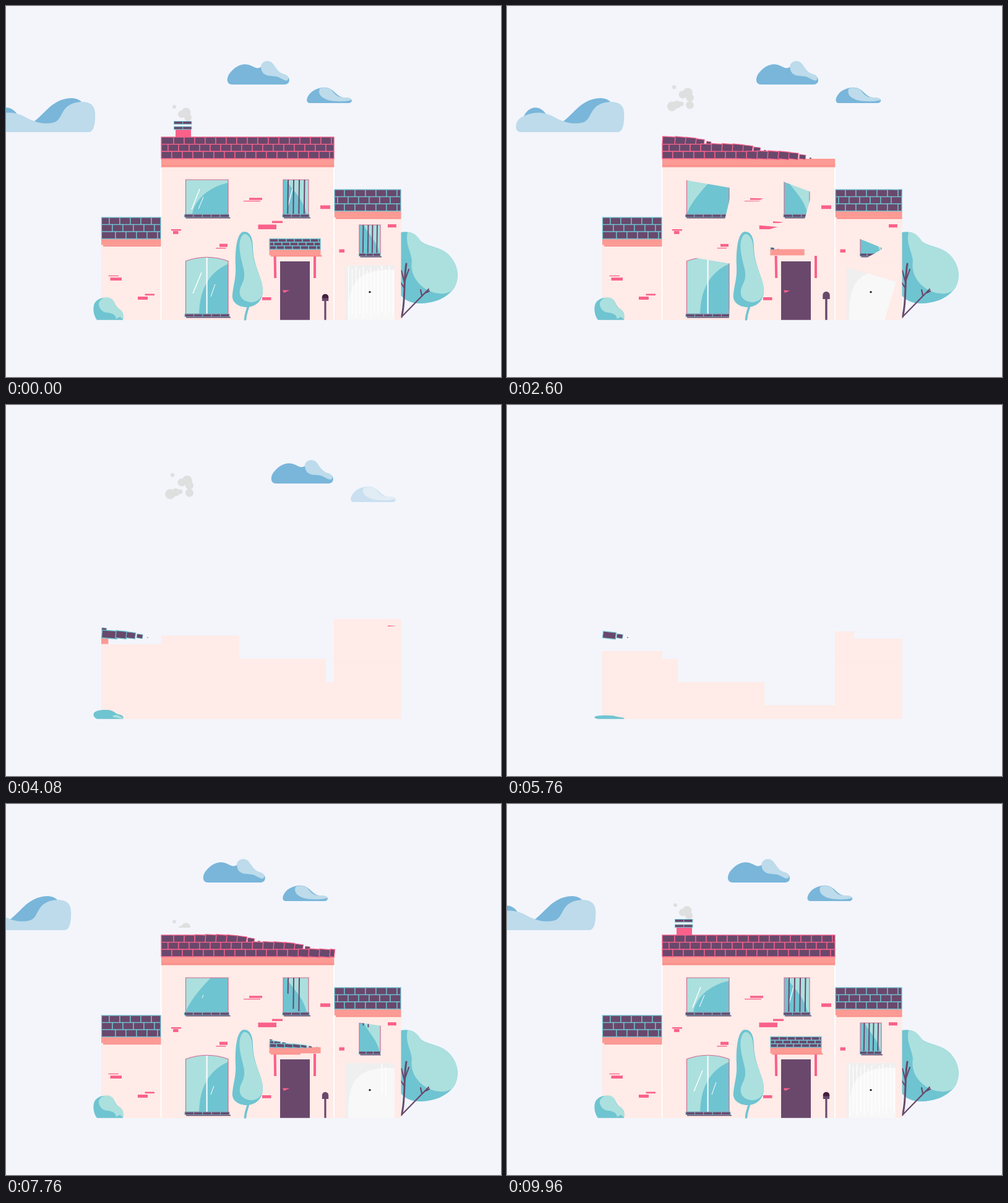
An HTML page for the animation above (10 s loop, 800x600 px).

```html
<!DOCTYPE html>
<html lang="en">
<head>
<meta charset="utf-8">
<title>House</title>
<style>
html,body{margin:0;width:100%;height:100%;overflow:hidden;background:#f3f5fb}
svg{display:block;width:800px;height:600px}
</style>
</head>
<body>
<svg id="stage" viewBox="0 0 800 600" xmlns="http://www.w3.org/2000/svg">
<defs><clipPath id="vent"><rect x="240" y="80" width="90" height="120"/></clipPath></defs>
</svg>
<script>
const NS = 'http://www.w3.org/2000/svg';
const stage = document.getElementById('stage');
const defs = stage.querySelector('defs');
const PURPLE = '#69486c', PINK = '#f9618b', SALMON = '#fc9a94', SALMON2 = '#fb918b',
      TEAL = '#6fc4d1', MINT = '#abe0de', WALL = '#ffebe7', GREY = '#dfdfdf';
const LOOP = 10000;
const parts = [];   // called with the folded time: the build is the teardown run backwards
const drift = [];   // called with the plain loop time

const clamp = v => Math.max(0, Math.min(1, v));
const prog = (t, start, dur) => clamp((t - start) / dur);
const back = (u, s = 1.7) => Math.max(0, 1 - u * u * ((s + 1) * u - s));

function add(tag, attrs, parent = stage) {
  const el = document.createElementNS(NS, tag);
  for (const k in attrs) el.setAttribute(k, attrs[k]);
  parent.appendChild(el);
  return el;
}
const group = (parent = stage) => add('g', {}, parent);
const path = (d, fill, parent) => add('path', {d, fill}, parent);
const rect = (x, y, width, height, fill, parent) => add('rect', {x, y, width, height, fill}, parent);
const line = (d, stroke, w, parent) =>
  add('path', {d, stroke, 'stroke-width': w, fill: 'none', 'stroke-linecap': 'round'}, parent);

// Scale out around a pivot, swelling first.
function shrink(el, x, y, start, dur, rot = 0, s = 1.7) {
  parts.push(t => {
    const u = prog(t, start, dur), k = back(u, s);
    el.setAttribute('transform', `translate(${x} ${y}) rotate(${rot * u}) scale(${k}) translate(${-x} ${-y})`);
    el.style.display = u < 1 ? '' : 'none';
  });
}

// Cut away by an edge that turns while it falls.
let clips = 0;
function wipe(el, x, y, w, h, start, dur) {
  const id = 'cut' + clips++;
  const poly = add('polygon', {}, add('clipPath', {id}, defs));
  el.setAttribute('clip-path', `url(#${id})`);
  parts.push(t => {
    const u = prog(t, start, dur);
    const pad = u ? 0 : 2;
    poly.setAttribute('points', [
      [x - pad, y + h * u ** 2.1 - pad], [x + w + pad, y + h * u ** 0.8 - pad],
      [x + w * (1 - u) + pad, y + h + pad], [x - pad, y + h + pad]].join(' '));
    el.style.display = u < 1 ? '' : 'none';
  });
}

// Bar that pulls back to its left end.
function slab(x, y, w, h, fill, start, dur) {
  const el = rect(x, y, w, h, fill);
  parts.push(t => el.setAttribute('width', w * (1 - prog(t, start, dur))));
}

// Line that pulls back to its first point.
function streak(x0, y0, x1, y1, color, w, start, dur, parent) {
  const el = line('', color, w, parent);
  el.setAttribute('stroke-linecap', 'butt');
  parts.push(t => {
    const k = 1 - prog(t, start, dur);
    el.setAttribute('d', `M${x0} ${y0}L${x0 + (x1 - x0) * k} ${y0 + (y1 - y0) * k}`);
    el.style.display = k ? '' : 'none';
  });
}

// Three rows of tiles; each row is [first joint, start time].
function roof(x0, x1, top, h, pitch, stroke, rows) {
  rows.forEach(([joint, start], r) => {
    const base = top + h * (r + 1);
    for (let a = x0, b = joint; a < x1 - 1; a = b, b += pitch) {
      const end = Math.min(b, x1);
      const el = add('rect', {x: 0, y: -h, width: end - a, height: h, fill: PURPLE, stroke, 'stroke-width': 1.3});
      const begin = start + Math.max(0, (x1 - pitch - a) / pitch * 80);
      const left = a;
      parts.push(t => {
        const u = prog(t, begin, 640);
        el.setAttribute('transform', `translate(${left} ${base}) rotate(${9 * u}) scale(${back(u)})`);
        el.style.display = u < 1 ? '' : 'none';
      });
    }
  });
}

// Clouds
function cloud(dark, light, outAt, outDur, inAt, inDur) {
  const g = group();
  path(dark, '#79b6da', g);
  path(light, '#bddbeb', g);
  drift.push(t => {
    const s = t < 5000 ? t : t - LOOP;
    g.setAttribute('transform', `translate(${s * 0.0174} 0)`);
    g.setAttribute('opacity', t < 5000 ? 1 - prog(t, outAt, outDur) : prog(t, inAt, inDur));
  });
}
cloud('M-19 180C-10 160 8 160 18 175ZM40 190C60 180 72 150 105 149C112 149 118 151 122 155L100 190Z',
  'M-23 204C-34 204 -33 186 -22 180C-6 171 10 170 26 177C44 187 58 192 74 189C95 187 84 157 122 155C141 155 145 165 144 180C144 195 140 204 134 204Z',
  3500, 400, 6600, 400);
cloud('M366 127C354 127 357 113 363 107C371 97 382 92 392 95C400 97 405 104 413 98C424 92 434 112 452 112C460 115 460 127 450 127Z',
  'M412 97C414 88 426 86 432 94C437 101 441 108 449 110C456 112 458 116 455 120C452 122 447 118 440 115C432 111 412 118 412 97Z',
  4250, 350, 6000, 300);
cloud('M490 157C484 156 486 148 490 143C496 135 508 131 517 132C530 133 533 146 545 148C552 148 559 149 559 153C558 157 555 157 552 157Z',
  'M507 134C512 131 523 132 527 137C533 145 537 148 548 148C553 148 559 149 558 152C550 155 530 155 520 152C508 148 504 141 507 134Z',
  3940, 210, 6420, 300);

// Smoke puffs: x, y, radius, late (1 = swells later)
const smoke = add('g', {'clip-path': 'url(#vent)', fill: GREY});
[[272, 163, 3, 0], [284, 175, 6, 0], [291, 172, 7.5, 0], [294, 180, 6, 0],
 [294, 192, 6, 1], [269, 194, 7.5, 1], [276, 191, 6, 1], [282, 190, 3.5, 1]].forEach(([x, y, r, late]) => {
  const c = add('circle', {}, smoke);
  drift.push(t => {
    const s = t < 5000 ? t : t - LOOP;
    c.setAttribute('cx', x + (x - 284) * Math.max(0, s) * 0.00006);
    c.setAttribute('cy', y - s * 0.0122);
    c.setAttribute('r', r * (late ? prog(s, 300, 1300) : prog(s, -2900, 700)) * (1 + Math.max(0, s) * 0.00002));
  });
});
drift.push(t => smoke.setAttribute('opacity', t < 5000 ? 1 - prog(t, 4300, 450) : 1));

// Tree on the right
const tree = group();
path('M638 366C650 364 660 366 668 378C676 389 700 388 714 401C732 418 733 440 725 455C712 474 690 481 668 481C655 481 645 476 638 468Z', TEAL, tree);
path('M649 366C660 366 665 372 671 381C680 390 700 388 714 401C732 418 733 440 725 455C718 466 705 467 690 463C668 456 652 435 656 412C654 395 645 385 649 366Z', MINT, tree);
line('M639 503C646 482 642 445 647 417', PURPLE, 3, tree);
line('M639 503L683 458M670 459L672 468M684 461L678 464M639 428L644 447M651 426L645 443M637 446L643 455', PURPLE, 2.2, tree);
shrink(tree, 639, 423, 3110, 850, 0, 2.4);

// Chimney
const chimney = group();
rect(274, 200, 25, 12, PINK, chimney);
rect(272.5, 190, 26, 6, '#fff', chimney);
[186.5, 195].forEach(y => {
  for (const x of [271.5, 285.7])
    add('rect', {x, y, width: 14.2, height: 4.6, fill: PURPLE, stroke: TEAL, 'stroke-width': 1}, chimney);
});
shrink(chimney, 273, 212, 1640, 560, 9);

// Walls, stacked strips pulled away from the top down
function wall(x, w, edges, start) {
  for (let i = 0; i < edges.length - 1; i++)
    slab(x, edges[i], w, edges[i + 1] - edges[i] + 0.3, WALL, start + 92 * i, w / 1.52);
}
wall(154, 97, [387, 398, 435.5, 473, 507.7], 4150);
wall(250.5, 279.7, [260.5, 298, 335.5, 373, 410.5, 448, 485.5, 507.7], 3704);
wall(530, 108.5, [342, 346, 366, 378, 415.5, 453, 490.5, 507.7], 4004);
[250.5, 530].forEach(x => streak(x, 507.7, x, 261, '#fff', 2, 3350, 350));

// Eaves
slab(251, 247, 279.3, 10.2, SALMON, 3195, 490);
slab(251, 257, 279.3, 3.7, SALMON2, 3000, 490);
slab(530.7, 332, 107.8, 9.8, SALMON, 3190, 500);
slab(533, 341.6, 105.5, 2.9, SALMON2, 3110, 500);
slab(154, 376.5, 96.5, 10, SALMON, 3640, 500);
slab(157, 386.4, 93.5, 2.6, SALMON2, 3540, 500);

// Roofs
roof(251, 530, 212, 11.6, 17, PINK, [[271, 1130], [262, 1530], [268, 1870]]);
roof(531, 638, 297, 11.5, 17, TEAL, [[547, 2540], [536, 2780], [547, 2960]]);
roof(154.5, 250, 342, 11.5, 17, TEAL, [[167, 3040], [172, 3140], [177, 3430]]);

// Window sill of small bricks
function sill(x, y, w, n, parent) {
  for (let i = 0; i < n; i++)
    add('rect', {x: x + w / n * i, y, width: w / n, height: 4.6, fill: PURPLE, stroke: TEAL, 'stroke-width': 0.9}, parent);
  rect(x + 2, y + 4.8, w, 1.6, PURPLE, parent);
}
function pane(d, shade, parent) {
  path(d, MINT, parent);
  const s = path(shade, TEAL, parent);
  add('path', {d, fill: 'none', stroke: '#cf6d92', 'stroke-width': 1.2}, parent);
  return s;
}

// Upper left window
const w1 = group();
const shade = pane('M290.5 281H359V337H290.5Z', '', w1);
parts.push(t => {
  const k = prog(t, 1850, 390), m = (a, b) => a + (b - a) * k;
  shade.setAttribute('d', `M${m(301, 291)} 337C${m(304, 292)} ${m(316, 326)} ${m(325, 312)} ${m(293, 300)} ${m(359, 331)} ${m(286, 281)}L359 281V337Z`);
});
streak(300, 329, 313, 296, '#fff', 1.4, 1900, 330, w1);
streak(319, 309, 311, 328, '#fff', 1, 1900, 450, w1);
sill(288.5, 337, 72, 5, w1);
wipe(w1, 287, 280, 77, 65, 2500, 650);

// Upper middle window
const w2 = group();
pane('M448 281H489V337H448Z', 'M448 281H453C462 298 480 310 486 337H448Z', w2);
streak(463, 296, 455, 326, '#fff', 1.2, 1800, 400, w2);
[[456, 2000], [465, 2200], [474, 2230], [482.5, 1750]].forEach(([x, s]) =>
  streak(x, 281, x - 0.7, 336, PURPLE, 2, s, 450, w2));
sill(447, 337, 43, 3, w2);
wipe(w2, 445, 280, 48, 65, 2450, 600);

// Arched window
const w3 = group();
pane('M290.5 498V412.5Q325 400 359 412.5V498Z', 'M312 498C313 462 325 432 359 417V498Z', w3);
rect(323.6, 407, 2, 91, '#fff', w3);
streak(302, 465, 316, 431, '#fff', 1.4, 1900, 330, w3);
streak(331, 470, 338, 450, '#fff', 1, 2100, 450, w3);
sill(289, 498, 72, 5, w3);
wipe(w3, 287, 404, 78, 101, 2550, 640);

// Window above the garage
const w4 = group();
pane('M571 354H605V401H571Z', 'M571 354H578C588 372 600 382 604 401H571Z', w4);
[[577.5, 1830], [585.5, 1860], [592.5, 1790], [600, 1490]].forEach(([x, s]) =>
  streak(x, 354, x - 0.7, 400, PURPLE, 1.9, s, 450, w4));
sill(570.5, 400, 34.5, 3, w4);
wipe(w4, 569, 353, 39, 54, 2200, 600);

// Loose bricks: x, y, w, h, start
[[165.5, 435.8, 16.5, 1.3, 3400], [168.5, 439.2, 18.5, 4.8, 3420],
 [213, 470, 16, 5, 3500], [224.5, 465.5, 15.5, 2.6, 3480],
 [267, 361, 16, 2.4, 3200], [270, 364, 8.5, 4.8, 2650],
 [345, 384.6, 13, 5, 2600], [339.5, 391, 16, 1.4, 2580],
 [384, 314.9, 27, 1.3, 2500], [393, 310.2, 21, 3.5, 2480],
 [407.5, 353.5, 29.5, 7.5, 2400], [430, 347.6, 17, 3.4, 2380],
 [508, 322.4, 16, 5.8, 2840], [414, 471, 14.5, 4.8, 3250],
 [538.5, 393.5, 8.5, 5.2, 3350], [617, 353, 13.8, 5.2, 3680]].forEach(([x, y, w, h, s]) =>
  wipe(rect(x, y, w, h, PINK), x, y, w, h, s, 480));

// Garage door
const garage = group();
path('M549 424Q549 419 554 419H625Q628 419 628 424V507.7H549Z', '#efefef', garage);
path('M553 507.7C553 460 556 424 628 427V507.7Z', '#f8f8f8', garage);
for (let i = 0; i < 13; i++) {
  const x = 553.5 + i * 6, late = i === 9 || i === 10;
  streak(x, 420 + i * 5 % 9, x, 506 - i * 7 % 13, '#fff', 1.3, late ? 2050 : 1450 + i * 7 % 5 * 70, 500, garage);
}
add('circle', {cx: 588, cy: 462.6, r: 1.7, fill: '#222'}, garage);
wipe(garage, 548, 418, 81, 90, 2450, 650);

// Front door
const door = group();
rect(443, 413, 48, 94.7, PURPLE, door);
wipe(path('M447 459.5L458.5 459.8L449 464Z', PINK, door), 447, 459, 12, 5, 2500, 350);
wipe(door, 443, 413, 48, 94.7, 2840, 800);

// Porch
streak(435.2, 440, 434.6, 404, PINK, 4, 2950, 800);
streak(499, 440, 499, 404, PINK, 4, 2650, 450);
slab(428, 403, 82.5, 2.3, SALMON2, 2050, 450);
slab(425.5, 393.3, 83, 10, SALMON, 2450, 450);
roof(426, 508, 376.5, 5.65, 13, TEAL, [[440, 1220], [433, 1370], [437, 1620]]);

// Lamp
const lamp = group();
rect(514.4, 476, 3.1, 31.7, PURPLE, lamp);
path('M510.8 477V471A5.2 5.2 0 0 1 521.2 471V477Z', PURPLE, lamp);
const cap = path('M510.8 472.5V471A5.2 5.2 0 0 1 521.2 471V472.5Z', '#45203f', lamp);
wipe(cap, 510.5, 465, 11, 8, 1850, 350);
shrink(lamp, 516, 507.7, 2350, 550);

// Cypress
const cypress = group();
line('M386.5 507C387 497 390 493 392 484', TEAL, 3.6, cypress);
path('M385 365C395 365 399 376 399 390C399 420 415 440 415 460C415 478 402 487 389 487C374 487 364 478 366 466C368 448 372 440 371 420C370 395 373 365 385 365Z', TEAL, cypress);
path('M382 371C388 364 398 375 398 392C399 420 415 440 415 460C415 473 405 479 397 479C384 479 376 470 378 460C380 448 388 445 384 425C379 405 373 383 382 371Z', MINT, cypress);
shrink(cypress, 387, 507.7, 3010, 700, 10);

// Bush
const bush = group();
path('M147 507.7C141 500 140 488 143 481C148 471 164 469 171 475C178 481 175 485 183 490C190 495 190 500 189 507.7Z', TEAL, bush);
const leaf = path('M150 480C154 470 168 468 174 477C177 483 175 486 183 490C190 495 190 502 188 507C184 500 183 504 178 506C176 498 172 498 166 496C158 497 149 490 150 480Z', MINT, bush);
shrink(leaf, 188, 507, 3650, 480);
parts.push(t => {
  const k = 1 - prog(t, 3700, 640);
  bush.setAttribute('transform', `translate(0 ${507.7 * (1 - k)}) scale(1 ${k})`);
  bush.style.display = k ? '' : 'none';
});

function draw() {
  const t = performance.now() % LOOP;
  const folded = t < LOOP / 2 ? t : LOOP - t;
  drift.forEach(f => f(t));
  parts.forEach(f => f(folded));
  requestAnimationFrame(draw);
}
draw();
</script>
</body>
</html>
```
